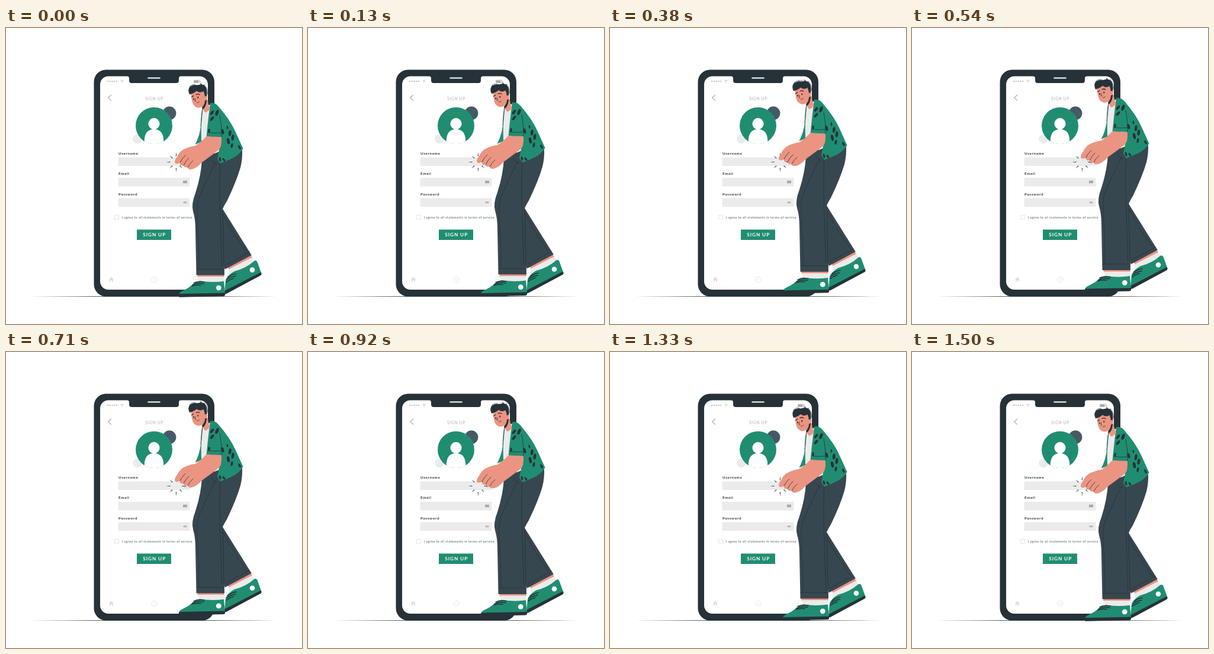
Write an HTML page that moves like this. It is 500x500 px and loops after 1.54 s.

```html
<!DOCTYPE html>
<html lang="en">
<head>
<meta charset="utf-8">
<title>Sign up</title>
<style>
html, body { margin: 0; width: 100%; height: 100%; overflow: hidden; background: #fff; }
svg { display: block; width: 100vw; height: 100vh; }
text { font-family: Lato, "Open Sans", sans-serif; fill: #263238; }
.label { font-size: 6.2px; font-weight: 700; letter-spacing: .7px; }
.dark { fill: #263238; }
.green { fill: #208d71; }
.skin { fill: #eb9481; }
.pants { fill: #37474f; }
.grey { fill: #ebebeb; }
.line { fill: none; stroke: #263238; stroke-width: .8; stroke-linecap: round; stroke-linejoin: round; }
.soft { fill: none; stroke: #e0e0e0; stroke-width: .8; }
</style>
</head>
<body>
<svg viewBox="0 0 500 500">
  <path class="dark" d="M42 453.6L150 453.2H350L458 453.6L350 454H150Z"/>

  <!-- phone -->
  <rect class="dark" x="148.5" y="70.5" width="203.5" height="383" rx="20.5"/>
  <rect x="159" y="81.5" width="182" height="360.5" rx="14" fill="#fff"/>
  <path class="dark" d="M205 81H295Q292 82 292 85V88.5Q292 93 287.5 93H212.5Q208 93 208 88.5V85Q208 82 205 81Z"/>
  <path d="M240.2 84.5H259.8" stroke="#fff" stroke-width="2" stroke-linecap="round"/>
  <g id="dots" fill="#c7c7c7"></g>
  <path d="M193.3 89Q196 86.8 198.7 89M194.6 90.4Q196 89.3 197.4 90.4" fill="none" stroke="#c4c4c4" stroke-width=".9"/>
  <circle cx="196" cy="91.4" r=".7" fill="#c4c4c4"/>
  <rect x="317.3" y="88" width="10" height="4.8" rx="1" fill="#e5e5e5" stroke="#aaa" stroke-width=".6"/>
  <path d="M318 88.7H325V92.2H318ZM327.6 89.4H328.6V91.4H327.6Z" fill="#a6a6a6"/>
  <path d="M177.9 113L172.6 117.8L177.9 122.6" fill="none" stroke="#adadad" stroke-width="1.2"/>
  <text x="235" y="122.2" font-size="6.7" font-weight="700" letter-spacing=".65" style="fill:#c7c7c7">SIGN UP</text>

  <!-- avatar -->
  <circle cx="276" cy="144" r="11.4" fill="#455a64"/>
  <circle class="grey" cx="222" cy="187.5" r="7.8"/>
  <circle class="green" cx="250" cy="165" r="31"/>
  <circle cx="250" cy="161.7" r="9.6" fill="#fff"/>
  <path d="M233.7 191.5C233.7 177 240 171 250 171S266.3 177 266.3 191.5A31 31 0 0 1 233.7 191.5Z" fill="#fff"/>

  <!-- form -->
  <text class="label" x="190" y="213.5">Username</text>
  <text class="label" x="190" y="248">Email</text>
  <text class="label" x="190" y="282.5">Password</text>
  <path class="grey" d="M189.5 218.5H310.5V233H189.5ZM189.5 253H310.5V267.5H189.5ZM189.5 287.5H310.5V302H189.5Z"/>
  <circle cx="302.5" cy="223.6" r="1.6" fill="#a6a6a6"/>
  <path d="M299.5 228.2Q302.5 222.5 305.5 228.2Z" fill="#a6a6a6"/>
  <rect x="299" y="257.8" width="7" height="4.5" rx=".5" fill="#a6a6a6"/>
  <path d="M299.4 258.4L302.5 260.4L305.6 258.4" fill="none" stroke="#c0c0c0" stroke-width=".4"/>
  <path d="M299 294.7Q302.5 291.3 306 294.7Q302.5 298 299 294.7Z" fill="#a6a6a6"/>
  <circle cx="302.5" cy="294.7" r=".8" fill="#ebebeb"/>
  <rect class="soft" x="183.4" y="316.2" width="7" height="7"/>
  <text x="196" y="321.8" font-size="5.2" letter-spacing=".48" style="fill:#455a64">I agree to all statements in terms of service</text>
  <path class="green" d="M221 340.5H279V358H221Z"/>
  <text x="231.2" y="352.3" font-size="8.2" font-weight="700" letter-spacing=".95" style="fill:#fff">SIGN UP</text>

  <!-- tab bar -->
  <path d="M173.8 424.6L178 420.6L182.2 424.6H181V428.8H179V426H177V428.8H175V424.6Z" fill="#e0e0e0"/>
  <circle class="soft" cx="250.5" cy="425" r="4.8"/>
  <path class="soft" d="M248.2 424L250.5 426.2L252.8 424"/>
  <path class="soft" d="M316 420.5H325M316 424.5H325M316 428.5H325"/>

  <g id="rays" class="dark"></g>

  <g id="man">
    <!-- back leg -->
    <path class="skin" d="M373 402L413 382L416.5 388L378 409Z"/>
    <path fill="#ebebeb" d="M375.5 407.3L415.5 386.8L421 395L384 415L376 416Z"/>
    <path class="green" d="M385 410.5Q406 405 419 393Q422.5 390.8 424.5 394.5L431 412.5L369 446.5Q370 435 371 425Q373 418 385 410.5Z"/>
    <path class="dark" d="M430.2 412Q433 414 430.5 417L373 447.8Q369 449.3 368 448.3V444.2Z"/>
    <circle cx="416" cy="408" r="4.3" fill="#fff"/>
    <path class="line" style="stroke-width:1.5" d="M389 414.5Q381 415.5 375 420.5M388 418.5Q380 419.5 373 424.5M384 422.5Q377 424.5 372 428.5"/>
    <path class="pants" d="M358 298L366 305L414.8 383L370 406.8L362 390Z"/>
    <path class="line" d="M366 313Q384 348 406 378M371 399.7L411 378"/>

    <!-- front foot -->
    <path class="skin" d="M323 415H368.5V420.5H324Z"/>
    <path fill="#ebebeb" d="M324.5 419.4H368V429H326Z"/>
    <path class="green" d="M327 426.6Q347 429.8 368 427L370 447.5L292 450.5Q292 445.5 299 443Q308 439 316 432Q321 427.4 327 426.6Z"/>
    <path class="dark" d="M292.5 448.4L370 446.8V450.6Q370 452.2 367 452.4L293 454Q290.5 452 292.5 448.4Z"/>
    <circle cx="359.3" cy="438.2" r="4.4" fill="#fff"/>
    <path class="line" style="stroke-width:1.5" d="M335 428.4Q324 426.8 317 430.2M334 431.4Q323 429.7 315 433.2M329 434Q321 432.8 314 435.2"/>

    <!-- front leg -->
    <path class="pants" d="M331 220Q330 247 320 278Q312.5 297 316 309Q320 322 320 340L321.5 416.8H369L368.5 380L366 305Q368 300 373 292Q389 259 396 235Q400 219 398.8 203L360 208Z"/>
    <path class="line" d="M354 226Q336 262 326 286Q322 297 323 318Q326 365 326 406M361.5 229Q360 275 362 315L364.5 402M366 306L368 400M322 406.8H368M347 222Q350 227 356 229"/>

    <!-- torso -->
    <path class="green" d="M333 131Q329 140 329 165Q327 182 319.5 196L334 190L339 150Z"/>
    <path fill="#ebebeb" d="M332 134L346 128L344 188L330 190Q329 160 332 134Z"/>
    <path class="green" d="M345 126.3Q353 124.2 360 133Q379 155.5 387 173.3L400.5 203Q395 212 385 218Q374 223.6 362 227.8L357 220L364 184L338.6 182.6Q341.5 152 345 126.3Z"/>
    <g id="spots" class="dark"></g>
    <path class="line" d="M361 147Q365 165 364 184M341 176Q352 177.6 363 176.2M332 136L329 165"/>

    <!-- neck and head -->
    <path class="skin" d="M331 123L333 137Q335 142 338 142L345 136.3Q342 132 340.5 120Z"/>
    <path class="skin" d="M312.5 108Q313 120 315.5 127Q319 134 326 134Q334 133 337 125L339 118L337 101L320 102Z"/>
    <path class="dark" d="M310 111.6Q306 103 311 98Q316 94.4 323 95.8Q334 92.4 338 100Q340.5 106 339 118Q339.5 130 333.6 136Q331 136.5 331 133.5Q336.4 128 336 121Q336.5 112 333.5 106Q327 110 322 105.5Q317 110 310 111.6Z"/>
    <path class="dark" d="M328.4 97L328.6 91.6L332 96.4L337 94.6L333.5 98Z"/>
    <path class="line" style="stroke-width:.6" d="M310 98Q314 93.6 319 94.5M336 96.5Q341 101 340.6 111"/>
    <path class="skin" d="M336 115Q339.4 112.6 340 116Q340 121 336 122Z"/>
    <ellipse class="dark" cx="317" cy="119.4" rx="1" ry="1.6"/>
    <ellipse class="dark" cx="324.3" cy="116.8" rx="1" ry="1.6"/>
    <path class="line" style="stroke-width:1.3" d="M313.8 116L316.6 113.8M321 111.8Q324 110 327 112"/>
    <path class="line" d="M319.8 118.5L319.2 122.6L321.2 122.8M322.5 125.6Q325 126 326.6 124"/>

    <!-- arm -->
    <path class="skin" d="M338.3 182.4L364 183.6Q364.5 192 363 199Q361 205 353 210L330 227Q322 236 314 238Q307 239 307 234.5Q300 236 300 231Q293 233.5 294 226.5L291 228Q286 230 285 226Q285 222 289 217Q292 210 298 205.5Q307 200 320 198Q331 191 338.3 182.4Z"/>
    <path class="line" d="M303 214.5Q297 220 293.8 226.8M309 219Q303.5 224 300 231.5M316 223.5Q310 228 307 235"/>
  </g>
</svg>
<script>
const LOOP = 1540, LEAD = 42, RISE = 10, REST = .7;
const $ = id => document.getElementById(id);
const man = $('man');

const ellipse = (x, y, rx, ry, turn = 0) =>
  `<ellipse cx="${x}" cy="${y}" rx="${rx}" ry="${ry}" transform="rotate(${turn} ${x} ${y})"/>`;

$('dots').innerHTML = [0, 1, 2, 3, 4].map(i => ellipse(172.2 + i * 3.7, 90, 1.3, 1.3)).join('');

// x, y, half length, tilt
$('spots').innerHTML = [
  [356.5, 142.5, 5.5, 22], [348, 142.5, 4.5, 38], [348, 152.5, 4.6, 40],
  [343, 173, 3.4, 5], [366, 174.5, 4.5, -15], [374, 167.5, 3, -5], [378.3, 177, 5, 8],
  [383, 184.5, 5, 8], [375.5, 190.5, 5.2, -12], [381.5, 198, 4, 12],
  [394.5, 201, 3.8, -28], [361.5, 221, 3.6, -12], [368, 222, 3.4, -35]
].map(([x, y, len, turn]) => ellipse(x, y, len * .46, len, turn)).join('');

$('rays').innerHTML = [0, 1, 2, 3, 4, 5, 6, 7].map(i => {
  const near = i % 2 ? 9 : 10, far = i % 2 ? 15.5 : 17;
  return `<path d="M-.7 ${-near}L0 ${-far}L.7 ${-near}Z" transform="translate(287.4 226.4) rotate(${i * 45})"/>`;
}).join('');

function draw(ms) {
  const lift = RISE * (1 - Math.cos(2 * Math.PI * (ms + LEAD) / LOOP)) / 2;
  man.setAttribute('transform', `translate(0 ${(REST - lift).toFixed(3)})`);
}

const start = performance.now();
function tick() {
  draw((performance.now() - start) % LOOP);
  requestAnimationFrame(tick);
}
draw(0);
requestAnimationFrame(tick);
</script>
</body>
</html>
```
